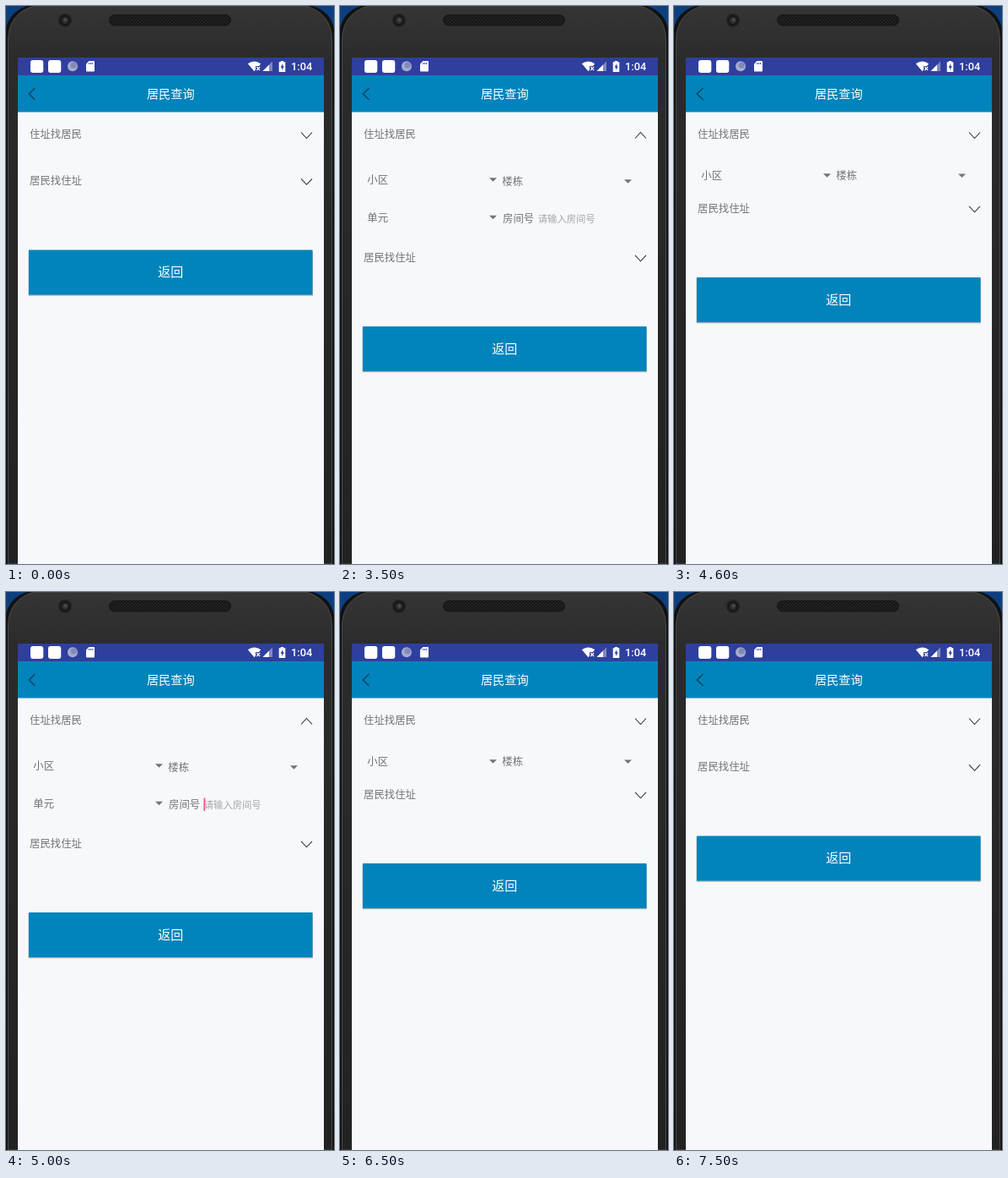
Write an HTML page that moves like this. It is 389 px wide and 660 px high and loops after 8.3 s.

```html
<!DOCTYPE html>
<html lang="zh-CN">
<head>
<meta charset="utf-8">
<title>居民查询</title>
<style>
@property --h { syntax: "<length>"; inherits: true; initial-value: 0px; }
@property --flip { syntax: "<number>"; inherits: true; initial-value: 1; }

html, body { margin: 0; width: 100%; height: 100%; overflow: hidden; background: #222; }
#stage {
  position: relative; width: 389px; height: 660px; overflow: hidden;
  animation: expand 8.3s step-end infinite;
}
svg { position: absolute; left: 0; top: 0; display: block; }
text { font: 12.4px "Noto Sans CJK SC", "Noto Sans CJK", sans-serif; fill: #737373; }
.title { font-size: 14.2px; font-weight: 500; fill: #fff; text-anchor: middle; }
.action { font-size: 15px; fill: #fff; text-anchor: middle; }
.hint { font-size: 11.3px; fill: #a6a6a6; }
.clock { font: 500 12.8px Roboto, sans-serif; fill: #fff; }
.chevron { fill: none; stroke: #333; stroke-width: 1.1; }
.tri { fill: #757575; }

/* --h is the open height of the panel; everything below it moves along */
.lower { transform: translateY(var(--h)); }
.toggle { transform-origin: 356.5px 153px; transform: scaleY(var(--flip)); }
.panel { position: absolute; left: 14px; top: 179px; width: 363px; height: var(--h); overflow: hidden; }
.panel svg { left: -14px; top: -179px; }
.area { transform: translateY(calc((min(var(--h), 44px) - 44px) * .43)); }
.block { transform: translateY(calc((min(var(--h), 44px) - 44px) * .6)); }
.caret { fill: #f0508a; animation: blink 8.3s step-end infinite; }

@keyframes expand {
  0% { --h: 0px; --flip: 1; }
  30.12% { --h: 32.5px; }
  31.325% { --h: 90.5px; --flip: -1; }
  46.385% { --h: 64px; }
  46.987% { --h: 28px; }
  47.59% { --h: 0px; --flip: 1; }
  55.421% { --h: 32.5px; }
  56.024% { --h: 66px; }
  56.626% { --h: 90.5px; --flip: -1; }
  65.662% { --h: 64px; }
  66.265% { --h: 28px; }
  66.867% { --h: 0px; --flip: 1; }
  78.313% { --h: 32.5px; }
  78.915% { --h: 66px; }
  79.518% { --h: 90.5px; --flip: -1; }
  89.156% { --h: 64px; }
  89.759% { --h: 28px; }
  90.361%, 100% { --h: 0px; --flip: 1; }
}
@keyframes blink {
  0%, 42.168%, 65.662%, 89.156%, 100% { opacity: 0; }
  36.746%, 60.24%, 84.337% { opacity: 1; }
}
</style>
</head>
<body>
<div id="stage">
  <svg width="389" height="660" viewBox="0 0 389 660">
    <defs>
      <linearGradient id="body" x1="0" y1="0" x2="0" y2="1">
        <stop offset="0" stop-color="#353535"/>
        <stop offset=".1" stop-color="#2b2b2b"/>
        <stop offset="1" stop-color="#222"/>
      </linearGradient>
      <pattern id="mesh" width="4" height="4" patternUnits="userSpaceOnUse">
        <rect width="4" height="4" fill="#161616"/>
        <circle cx="1" cy="1" r=".8" fill="#303030"/>
        <circle cx="3" cy="3" r=".8" fill="#303030"/>
      </pattern>
      <path id="down" class="chevron" d="M350 149.5l6.5 7 6.5-7"/>
      <path id="tri" class="tri" d="M-4.5-2.2h9L0 2.3z"/>
    </defs>

    <!-- phone -->
    <rect width="389" height="660" fill="#0d3f80"/>
    <path d="M0 660V26Q5 6 25 0H364Q384 6 389 26V660z" fill="#111"/>
    <path d="M2.5 660V40Q3 9 33 0H356Q386 9 386.5 40V660z" fill="url(#body)" stroke="#4b4b4b"/>
    <circle cx="70" cy="17" r="8" fill="#202020"/>
    <circle cx="70" cy="17" r="5" fill="#2d2d2d" stroke="#151515" stroke-width="1.5"/>
    <circle cx="70.5" cy="16.5" r="2" fill="#4a4a4d"/>
    <rect x="122.5" y="10.5" width="144" height="12.5" rx="6.2" fill="url(#mesh)" stroke="#141414"/>

    <!-- screen -->
    <rect x="14" y="61" width="363" height="599" fill="#f6f8fb"/>
    <rect x="14" y="61" width="363" height="21" fill="#2f3f9e"/>
    <rect x="14" y="82" width="363" height="43.5" fill="#0084bb"/>

    <!-- status bar -->
    <g fill="#fff">
      <rect x="29" y="64" width="15.3" height="15" rx="3"/>
      <rect x="50" y="64" width="15.3" height="15" rx="3"/>
      <circle cx="79" cy="71.3" r="6" fill="#a5abcf"/>
      <circle cx="80.2" cy="70" r="3.6" fill="#8189b8"/>
      <path d="M98.5 65h5.5q1 0 1 1v10.500q0 1-1 1h-8q-1 0-1-1V68.500z"/>
      <path d="M98.700 67v2m2-2v2m2-2v2" stroke="#2f3f9e"/>
      <path d="M286.800 68.300Q294.500 62.500 302.200 68.300L300 71H296v4.500L294.500 77.300z"/>
      <path d="M297.300 72l3.800 4m0-4l-3.800 4" stroke="#fff" stroke-width="1.200"/>
      <path d="M304.500 77L316 65.500V77z" fill="#8088c0"/>
      <path d="M304.500 77L312 69.500V77z"/>
      <path d="M325.800 65h3.400v1.300h2.100V78h-7.600V66.300h2.100z"/>
      <path d="M328.300 68l-2.800 4.800h1.700v3.200l2.700-4.800h-1.600z" fill="#2f3f9e"/>
    </g>
    <text class="clock" x="338" y="76.300">1:04</text>

    <!-- toolbar -->
    <path d="M34.500 97l-7.200 7 7.200 7" fill="none" stroke="#123f58" stroke-width="1.300"/>
    <text class="title" x="195.300" y="109.300">居民查询</text>

    <text x="28" y="156.200">住址找居民</text>
    <g class="toggle"><use href="#down"/></g>

    <g class="lower">
      <text x="28" y="211">居民找住址</text>
      <use href="#down" y="54.800"/>
      <rect x="26.500" y="290" width="337.500" height="53" rx="1" fill="#000" opacity=".16"/>
      <rect x="26.700" y="289.300" width="337" height="53" fill="#000" opacity=".2"/>
      <rect x="27" y="288.500" width="336.500" height="53" fill="#0084bb"/>
      <text class="action" x="195.200" y="320.300">返回</text>
    </g>
  </svg>

  <div class="panel">
    <svg width="389" height="660" viewBox="0 0 389 660">
      <g class="area">
        <text x="32.300" y="210.200">小区</text>
        <use href="#tri" x="181.500" y="205.500"/>
      </g>
      <g class="block">
        <text x="192.300" y="212">楼栋</text>
        <use href="#tri" x="341.500" y="207.500"/>
      </g>
      <text x="32.300" y="254.500">单元</text>
      <use href="#tri" x="181.500" y="250"/>
      <text x="193" y="256">房间号</text>
      <text class="hint" x="234.800" y="255.700">请输入房间号</text>
      <rect class="caret" x="234.500" y="243.500" width="1.700" height="15.500"/>
    </svg>
  </div>
</div>
</body>
</html>
```
